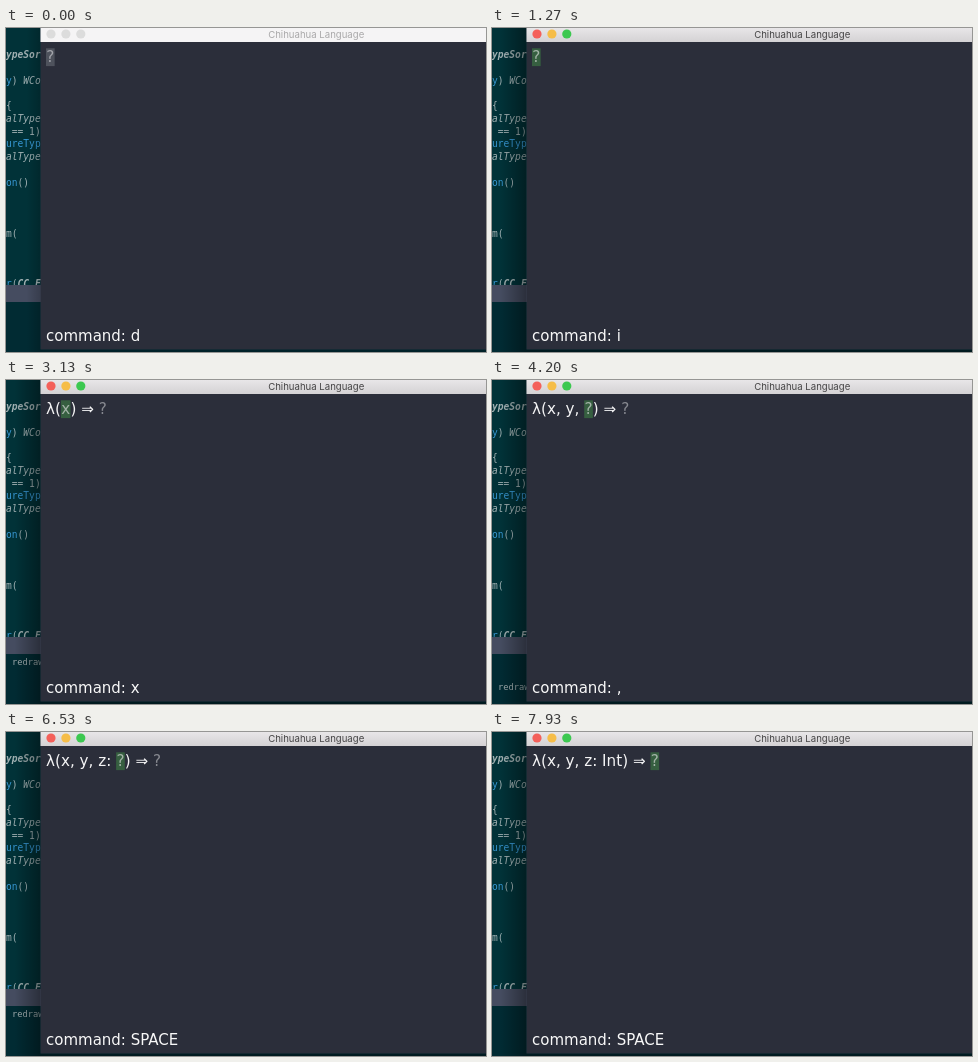
An HTML page with a canvas that plays this animation: 480x324 px, repeating every 8000 ms.

```html
<!DOCTYPE html>
<html lang="en">
<head>
<meta charset="utf-8">
<title>Structure editor</title>
<style>
  html, body { margin: 0; width: 100%; height: 100%; overflow: hidden; background: #012f36; }
  canvas { display: block; width: 480px; height: 324px; }
</style>
</head>
<body>
<canvas id="stage"></canvas>
<script>
const W = 480, H = 324, LOOP = 8000;
const LEFT = 34.5, BAR = 14, BOTTOM = 321.5;
const ACTIVE_AT = 70;
const TERM = '15.2px "DejaVu Sans", sans-serif';
const COMMAND = '15px "DejaVu Sans", sans-serif';
const MONO = '"DejaVu Sans Mono", monospace';

// [time, key, text with the selection in brackets, y of the log line]
const steps = [
  [0, 'd', '[?]'],
  [930, 'i', '[?]'],
  [1870, 'l', '[l]'],
  [2000, 'a', '[la]', 320],
  [2400, 'm', '[lam]', 307],
  [2730, 'SPACE', 'λ([?]) ⇒ ?', 294.5],
  [3000, 'x', 'λ([x]) ⇒ ?', 282],
  [3600, ',', 'λ(x, [?]) ⇒ ?'],
  [3730, 'y', 'λ(x, [y]) ⇒ ?', 320],
  [4070, ',', 'λ(x, y, [?]) ⇒ ?', 307],
  [4600, 'z', 'λ(x, y, [z]) ⇒ ?', 294.5],
  [5270, 'SPACE', 'λ(x, y, z: [?]) ⇒ ?', 282],
  [6670, 'I', 'λ(x, y, z: [I]) ⇒ ?'],
  [6930, 'n', 'λ(x, y, z: [In]) ⇒ ?'],
  [7200, 't', 'λ(x, y, z: [Int]) ⇒ ?'],
  [7600, 'SPACE', 'λ(x, y, z: Int) ⇒ [?]']
];

// Code behind the window: [row, style, runs of colour and text, slanted runs]
const PALE = '#a0b0b2', BLUE = '#3797d3';
const code = [
  [0, 'italic bold', [PALE, 'ypeSort']],
  [2, '', [BLUE, 'y', PALE, ') '], [PALE, 'WCon']],
  [4, '', [PALE, '{']],
  [5, 'italic', [PALE, 'alType']],
  [6, '', [PALE, ' == 1)']],
  [7, '', [BLUE, 'ureType']],
  [8, 'italic', [PALE, 'alType']],
  [10, '', [BLUE, 'on', PALE, '()']],
  [14, '', [PALE, 'm(']],
  [18, '', [BLUE, 'r', PALE, '('], [PALE, 'CC_F']]
];

const canvas = document.getElementById('stage');
const ctx = canvas.getContext('2d');
const ratio = window.devicePixelRatio || 1;
canvas.width = W * ratio;
canvas.height = H * ratio;
ctx.scale(ratio, ratio);

function rect(x, y, w, h, fill) {
  ctx.fillStyle = fill;
  ctx.fillRect(x, y, w, h);
}

function write(text, x, y, font, fill) {
  ctx.font = font;
  ctx.fillStyle = fill;
  ctx.fillText(text, x, y);
  return x + ctx.measureText(text).width;
}

function fade(x0, y0, x1, y1, from, to) {
  const g = ctx.createLinearGradient(x0, y0, x1, y1);
  g.addColorStop(0, from);
  g.addColorStop(1, to);
  return g;
}

function drawRuns(runs, x, y, font) {
  for (let i = 0; i < runs.length; i += 2) x = write(runs[i + 1], x, y, font, runs[i]);
  return x;
}

function drawBackdrop(active, logY) {
  rect(0, 0, W, H, '#013238');
  for (const [row, style, main, slanted] of code) {
    const y = 30.3 + row * 12.73;
    const x = drawRuns(main, 0, y, `${style} 9.6px ${MONO}`);
    if (slanted) drawRuns(slanted, x, y, `italic ${row > 9 ? 'bold' : ''} 9.6px ${MONO}`);
  }
  rect(0, 257, W, 17, '#454c60');
  rect(0, 274, W, 50, '#012b33');
  if (logY) write('redrawn and', 6, logY + 3, `8.7px ${MONO}`, '#a2aeb0');
  const depth = active ? 0.38 : 0.2, reach = active ? 26 : 14;
  rect(LEFT - reach, 0, reach, H, fade(LEFT - reach, 0, LEFT, 0, 'rgba(0,0,0,0)', `rgba(0,0,0,${depth})`));
  rect(LEFT, BOTTOM, W, H, `rgba(0,0,0,${depth})`);
}

function drawWindow(active) {
  rect(LEFT, 0, W - LEFT, BOTTOM, '#2b2e3a');
  rect(LEFT, 0, W - LEFT, BAR, active ? fade(0, 0, 0, BAR, '#e8e6e8', '#d4d2d4') : '#f5f4f5');
  const lights = active ? ['#f4605a', '#f6bd48', '#3cc850'] : ['#dcdcdc', '#dcdcdc', '#dcdcdc'];
  lights.forEach((fill, i) => {
    ctx.beginPath();
    ctx.arc(45 + i * 14.9, 6, 4.6, 0, Math.PI * 2);
    ctx.fillStyle = fill;
    ctx.fill();
  });
  ctx.textAlign = 'center';
  write('Chihuahua Language', 310.2, 10, '9.6px Inter, sans-serif', active ? '#464546' : '#aaa9aa');
  ctx.textAlign = 'left';
}

function drawTerm(term, insert) {
  const [before, selected, after] = term.split(/[\[\]]/);
  let x = write(before, 40, 34, TERM, '#f4f4f5');
  const width = ctx.measureText(selected).width;
  rect(x, 20.3, width + 0.6, 17.8, insert ? '#365f40' : '#4e525c');
  x = write(selected, x + 0.3, 34, TERM, insert ? '#a3b3a7' : '#a2a4aa') + 0.3;
  const hole = after.endsWith('?');
  x = write(hole ? after.slice(0, -1) : after, x, 34, TERM, '#f4f4f5');
  if (hole) write('?', x, 34, TERM, '#878990');
}

function frame(now) {
  const t = now % LOOP;
  const [, key, term, logY] = steps.filter(s => s[0] <= t).pop();
  const active = t >= ACTIVE_AT;
  drawBackdrop(active, logY);
  drawWindow(active);
  drawTerm(term, key !== 'd');
  write('command: ' + key, 40, 313, COMMAND, '#f8f8f8');
}

const origin = performance.now();
function tick() {
  frame(performance.now() - origin);
  requestAnimationFrame(tick);
}
tick();
</script>
</body>
</html>
```
